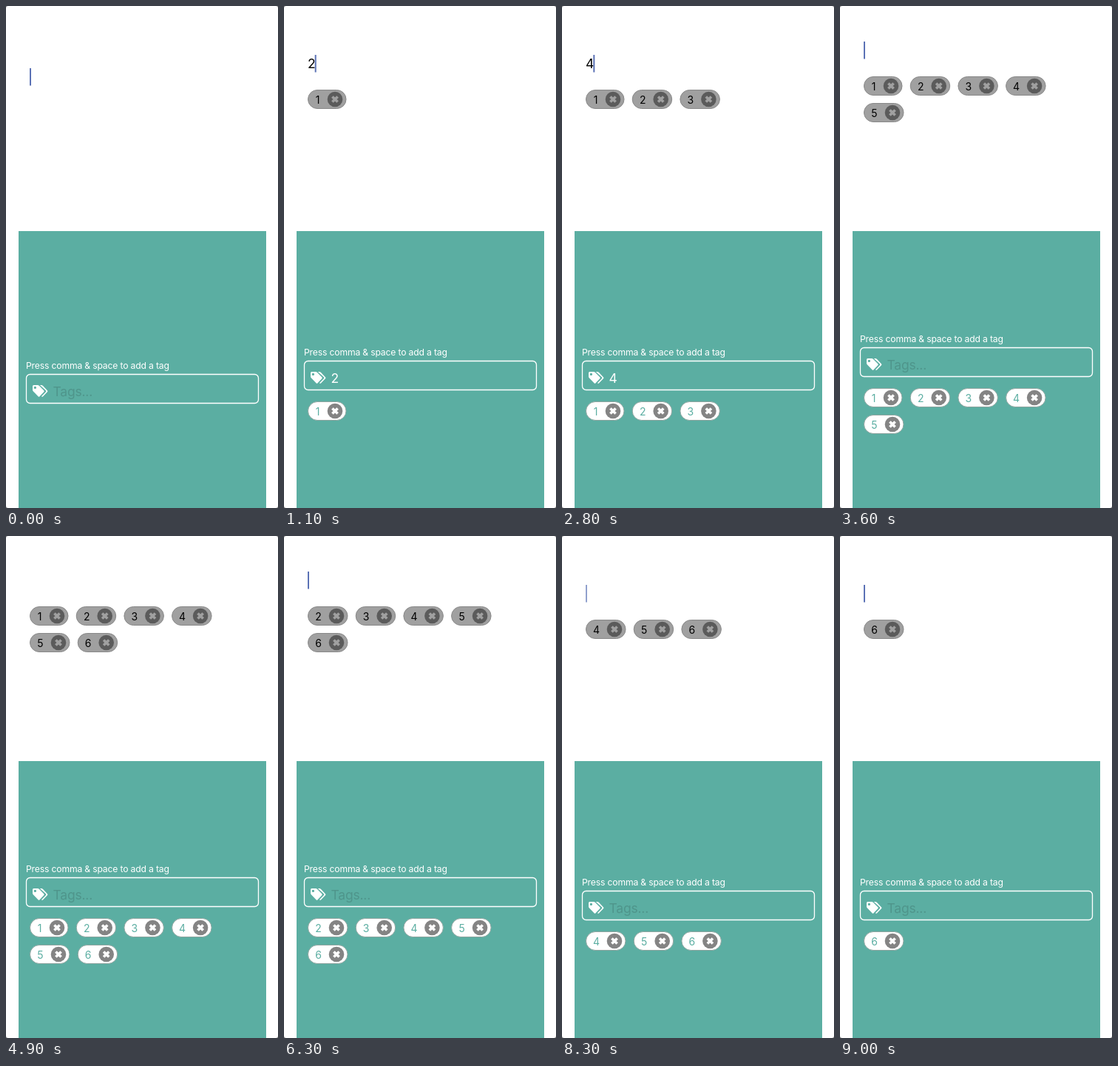
Recreate the animation shown at these times as an HTML page. Size 368x678 px, loop 9300 ms.

```html
<!DOCTYPE html>
<html lang="en">
<head>
<meta charset="utf-8">
<title>Tag input</title>
<style>
html, body { margin: 0; width: 100%; height: 100%; overflow: hidden; background: #777; }
svg { display: block; width: 368px; height: 678px; background: #fff; border-radius: 3px; }
text { font-family: Inter, "Open Sans", sans-serif; white-space: pre; }
.label { font-size: 12.2px; letter-spacing: -.18px; fill: #fff; }
.input { font-size: 17.5px; letter-spacing: -.2px; }
.chip { font-size: 14px; text-anchor: middle; }
</style>
</head>
<body>
<svg viewBox="0 0 368 678">
  <rect x="17" y="304" width="335" height="374" fill="#5baea2"/>
  <g id="typed">
    <text id="top" class="input" x="32" y="84"/>
    <rect id="caret" y="66" width="2" height="23.5" fill="#5b72b5"/>
  </g>
  <g id="field">
    <text class="label" x="27" y="472">Press comma &amp; space to add a tag</text>
    <rect x="27.5" y="479.5" width="314" height="39" rx="5" fill="none" stroke="#fff" stroke-width="1.3"/>
    <g fill="#fff">
      <path d="M36 495.5q0-1.5 1.5-1.5h5.3q1.2 0 2.2 1l6.2 6.3q1 1 0 2l-5.7 5.9q-1 1-2 0l-6.3-6.4q-1.2-1-1.2-2.2z"/>
      <path d="M45.800 494h2q1.200 0 2.200 1l5.900 6.300q1 1 0 2l-5.800 5.900q-1.100 1-2.200.1l5.900-6q1-1 0-2z"/>
    </g>
    <circle cx="39.400" cy="497.400" r="1.600" fill="#5baea2"/>
    <text id="bottom" class="input" x="63.500" y="509"/>
  </g>
  <g id="chips"></g>
</svg>
<script>
const LOOP = 9300, STEP = 100;
// [time, text being typed, tags]
const states = [
  [0, '', ''], [300, '1', ''], [600, '1,', ''],
  [700, '', '1'], [1100, '2', '1'], [1300, '2,', '1'],
  [1400, '', '12'], [2300, '3', '12'], [2400, '3,', '12'],
  [2500, '', '123'], [2800, '4', '123'], [3100, '4,', '123'],
  [3200, '', '1234'], [3400, '5', '1234'],
  [3600, '', '12345'], [3800, '6', '12345'], [4100, '6,', '12345'],
  [4200, '', '123456'], [6300, '', '23456'], [6700, '', '3456'],
  [7800, '', '456'], [8500, '', '56'], [8900, '', '6']
];
// [fade start, fully hidden, shown again]
const blinks = [
  [1900, 2100, 2300], [4600, 4900, 5300], [5700, 5900, 6200],
  [6600, 6700, 6700], [7100, 7400, 7700], [8300, 8500, 8500]
];
const $ = id => document.getElementById(id);
let shown;

function chip(tag, x, y, w, light) {
  const cx = x + w - 15.5, cy = y + 13;
  const [fill, edge, ink, disc, cross] = light
    ? ['#fff', '#8fa5a0', '#5baea2', '#848484', '#fff']
    : ['#a0a0a0', '#888', '#000', '#5b5b5b', '#a0a0a0'];
  return `<rect x="${x + .5}" y="${y + .5}" width="${w - 1}" height="25" rx="12.5" fill="${fill}" stroke="${edge}"/>
    <text class="chip" x="${x + (w - 25.5) / 2}" y="${y + 18.5}" fill="${ink}">${tag}</text>
    <circle cx="${cx}" cy="${cy}" r="10.3" fill="${disc}"/>
    <path d="M${cx - 3.6} ${cy - 3.6}l7.2 7.2m0-7.2l-7.2 7.2" stroke="${cross}" stroke-width="3.6"/>`;
}

function chipList(tags, top, light) {
  let x = 32, out = '';
  [...tags].forEach((tag, i) => {
    if (i % 4 === 0) x = 32;
    const w = tag === '1' ? 52.5 : 54.5;
    out += chip(tag, x, top + 36 * Math.floor(i / 4), w, light);
    x += w + 10.2;
  });
  return out;
}

function render([, text, tags]) {
  // Each new row of chips lifts the centred content by half a row.
  const lift = 18 * (1 - Math.ceil(tags.length / 4));
  for (const id of ['typed', 'field', 'chips'])
    $(id).setAttribute('transform', `translate(0 ${lift})`);
  $('top').textContent = text;
  $('bottom').textContent = text || 'Tags...';
  $('bottom').setAttribute('fill', text ? '#fff' : '#4f958b');
  $('caret').setAttribute('x', 32 + (text ? $('top').getComputedTextLength() - .8 : 0));
  $('chips').innerHTML = chipList(tags, 113, false) + chipList(tags, 534, true);
}

function caretOpacity(t) {
  const b = blinks.find(([start, , end]) => t >= start && t < end);
  return b ? Math.max(0, 1 - (t - b[0] + STEP) / (b[1] - b[0] + STEP)) : 1;
}

function tick() {
  const t = Math.floor(performance.now() % LOOP / STEP) * STEP;
  const state = states.findLast(s => s[0] <= t);
  if (state !== shown) render(shown = state);
  $('caret').setAttribute('opacity', caretOpacity(t));
  requestAnimationFrame(tick);
}
tick();
</script>
</body>
</html>
```
